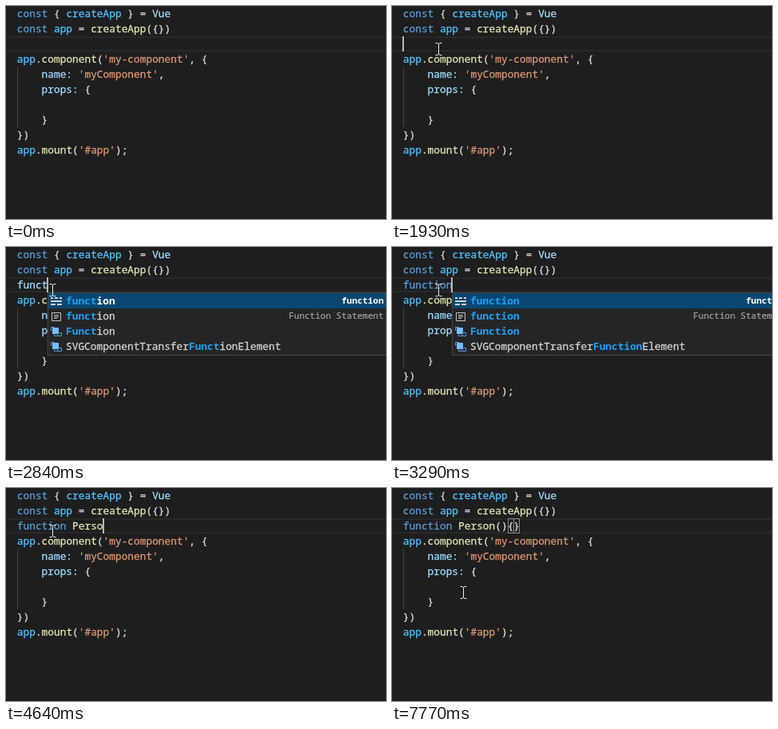
These frames come from a looping animation (476 px wide and 267 px high, 7990 ms). An HTML page:

```html
<!DOCTYPE html>
<html lang="en">
<head>
<meta charset="utf-8">
<title>Code editor</title>
<style>
  html, body { margin: 0; width: 100%; height: 100%; overflow: hidden; background: #1e1e1e; }
  svg { display: block; width: 476px; height: 267px; }
  text { font: 12.83px "Noto Sans Mono", "DejaVu Sans Mono", monospace; white-space: pre; }
  text, tspan { fill: currentColor; stroke: currentColor; stroke-width: .3; }
  .item { color: #d4d4d4; }
  .detail { font-size: 11px; color: #a8a8a8; stroke-width: .15; }
  .selected text { color: #fff; font-weight: bold; stroke-width: 0; }
  .item .hit { color: #18a3ff; font-weight: bold; stroke-width: 0; }
</style>
</head>
<body>
<svg id="stage" viewBox="0 0 476 267">
  <rect width="476" height="267" fill="#1e1e1e"/>
  <rect x="-4" y="39" width="490" height="17" fill="none" stroke="#282828" stroke-width="2"/>
  <path d="M14.5 76V152" stroke="#45423a"/>
  <g id="code"></g>
  <g id="typed"></g>
  <g id="squiggles" fill="none" stroke="#e58a84"></g>
  <rect id="caret" y="38" width="2" height="19" fill="#b8b8b4"/>
  <g id="popup"></g>
  <g id="mouse" fill="none">
    <path d="M-3.5 -7.5H-1L.5 -6.5L2 -7.5H4.5M.5 -6.5V6.5M-3.5 7.5H-1L.5 6.5L2 7.5H4.5" stroke="#e8e8e8"/>
  </g>
</svg>
<script>
const LOOP = 7990, X0 = 13.8, CHAR = 7.697, LINE = 19;
const color = {
  key: '#569cd6', constant: '#4fc1ff', prop: '#9cdcfe',
  fn: '#e2e2b0', str: '#dc9674', plain: '#dcdcd4'
};
const $ = id => document.getElementById(id);
const column = n => X0 + n * CHAR;
const span = (kind, text) => `<tspan color="${color[kind]}">${text}</tspan>`;
const codeLine = (row, tokens) =>
  `<text x="${X0}" y="${row * LINE + 14}">${tokens.map(t => span(...t)).join('')}</text>`;

const program = [
  [0, [['key', 'const'], ['plain', ' { '], ['constant', 'createApp'], ['plain', ' } = '], ['prop', 'Vue']]],
  [1, [['key', 'const'], ['constant', ' app'], ['plain', ' = '], ['fn', 'createApp'], ['plain', '({})']]],
  [3, [['constant', 'app'], ['plain', '.'], ['fn', 'component'], ['plain', '('], ['str', "'my-component'"], ['plain', ', {']]],
  [4, [['prop', '    name:'], ['str', " 'myComponent'"], ['plain', ',']]],
  [5, [['prop', '    props:'], ['plain', ' {']]],
  [7, [['plain', '    }']]],
  [8, [['plain', '})']]],
  [9, [['constant', 'app'], ['plain', '.'], ['fn', 'mount'], ['plain', '('], ['str', "'#app'"], ['plain', ');']]]
];
$('code').innerHTML = program.map(l => codeLine(...l)).join('');

const suggestions = [
  ['keyword', 'function', 'function'],
  ['snippet', 'function', 'Function Statement'],
  ['variable', 'Function'], ['variable', 'FocusNavigationEvent'], ['variable', 'FocusEvent'],
  ['variable', 'SVGComponentTransferFunctionElement'],
  ['keyword', 'for'], ['keyword', 'false'], ['keyword', 'finally'],
  ['variable', 'fetch'], ['variable', 'File'], ['variable', 'FileList']
];

const icons = {
  keyword: '<path d="M0 5h3m2 0h4m2 0h3M0 9h14M0 13h6m2 0h6" stroke="#d0d0d0" stroke-width="2"/>',
  snippet: '<path d="M1.5 4.5h11v10h-11zM4 7.5h6M4 9.5h6M4 11.5h4" fill="none" stroke="#c5c5c5"/>',
  variable: '<rect x="2" y="4" width="8" height="8" rx="1" fill="#75beff"/>' +
    '<path d="M.5 8V3.5h4M9 10.5h4.5v4h-4.5zM4.5 12v2.5h4" fill="none" stroke="#4f9fe0"/>'
};

// Indices of the matched letters: a contiguous run if possible, else a subsequence.
function matchLetters(label, query) {
  const lower = label.toLowerCase(), at = lower.indexOf(query);
  if (at >= 0) return [...query].map((_, i) => at + i);
  const hits = [];
  for (const letter of query) {
    const next = lower.indexOf(letter, hits.length ? hits[hits.length - 1] + 1 : 0);
    if (next < 0) return null;
    hits.push(next);
  }
  return hits;
}

function drawPopup(query) {
  const left = Math.round(column(query.length)) + .5;
  const rows = suggestions
    .map(([icon, label, detail = '']) => ({ icon, label, detail, hits: matchLetters(label, query) }))
    .filter(row => row.hits);
  const body = rows.map(({ icon, label, detail, hits }, i) => {
    const letters = [...label].map((c, k) => hits.includes(k) ? `<tspan class="hit">${c}</tspan>` : c).join('');
    return `<g class="item ${i ? '' : 'selected'}" transform="translate(0 ${58 + i * LINE})">
      ${i ? '' : '<rect x=".5" width="430" height="19" fill="#094771"/>'}
      <g transform="translate(3.5 1)">${icons[icon]}</g>
      <text x="22.5" y="14">${letters}</text>
      <text class="detail" x="420.5" y="13" text-anchor="end">${detail}</text></g>`;
  }).join('');
  return `<g transform="translate(${left} 0)">
    <rect y="57.5" width="431" height="${rows.length * LINE + 2}" fill="#252526" stroke="#454545"/>${body}</g>`;
}

function drawTyped(text, bracket) {
  const tokens = text.startsWith('function')
    ? [['key', 'function'], ['fn', text.slice(8).replace(/[(){}]/g, '')], ['plain', text.replace(/[^(){}]/g, '')]]
    : [['prop', text]];
  const boxes = bracket ? [bracket, bracket + 1].map(n =>
    `<rect x="${Math.round(column(n)) + .5}" y="38.5" width="7" height="18" fill="#006400" fill-opacity=".1" stroke="#888"/>`) : [];
  return boxes.join('') + codeLine(2, tokens);
}

function squiggle(row, col, count) {
  let d = `M${column(col)} ${row * LINE + 18}`;
  for (let i = 0; i < count * CHAR / 3 - 1; i++) d += `l3 ${i % 2 ? 2.5 : -2.5}`;
  return `<path d="${d}"/>`;
}

// Each step changes only the properties it names.
const early = squiggle(3, 3, 1) + squiggle(9, 0, 3), late = squiggle(3, 0, 3);
const steps = [
  [0, { text: '', at: 0, caret: false, popup: false, bracket: 0, marks: '', mouse: null }],
  [130, { caret: true }],
  [350, { mouse: [116, 108] }],
  [580, { caret: false, mouse: [91, 83] }],
  [810, { mouse: [65, 60] }],
  [1040, { caret: true, mouse: [58, 54] }],
  [1490, { caret: false }],
  [1930, { caret: true }],
  [2150, { text: 'f', at: 1, popup: true }],
  [2380, { text: 'fun', at: 3 }],
  [2610, { text: 'func', at: 4 }],
  [2840, { text: 'funct', at: 5 }],
  [3070, { text: 'functio', at: 7 }],
  [3290, { text: 'function', at: 8 }],
  [3520, { text: 'function ', at: 9, popup: false }],
  [3750, { marks: early }],
  [3970, { text: 'function P', at: 10 }],
  [4200, { text: 'function Per', at: 12, marks: '' }],
  [4640, { text: 'function Perso', at: 14 }],
  [5080, { text: 'function Person', at: 15 }],
  [5530, { text: 'function Person()', at: 16, bracket: 15 }],
  [5750, { at: 17 }],
  [5980, { marks: late }],
  [6200, { text: 'function Person(){}', at: 18, bracket: 17 }],
  [6660, { caret: false }],
  [6880, { marks: '', mouse: [60, 64] }],
  [7110, { caret: true, mouse: [66, 92] }],
  [7330, { mouse: [75, 133] }],
  [7550, { mouse: [81, 154] }],
  [7770, { caret: false, mouse: [89, 131] }]
];

let shown = -1;
function render(time) {
  const index = steps.filter(s => s[0] <= time).length - 1;
  if (index === shown) return;
  shown = index;
  const s = Object.assign({}, ...steps.slice(0, index + 1).map(step => step[1]));
  $('typed').innerHTML = drawTyped(s.text, s.bracket);
  $('squiggles').innerHTML = s.marks;
  $('popup').innerHTML = s.popup ? drawPopup(s.text) : '';
  $('caret').setAttribute('x', Math.round(column(s.at) - 1));
  $('caret').style.display = s.caret ? '' : 'none';
  $('mouse').style.display = s.mouse ? '' : 'none';
  if (s.mouse) $('mouse').setAttribute('transform', `translate(${s.mouse})`);
}

const start = performance.now();
function tick() {
  render((performance.now() - start) % LOOP);
  requestAnimationFrame(tick);
}
tick();
</script>
</body>
</html>
```
